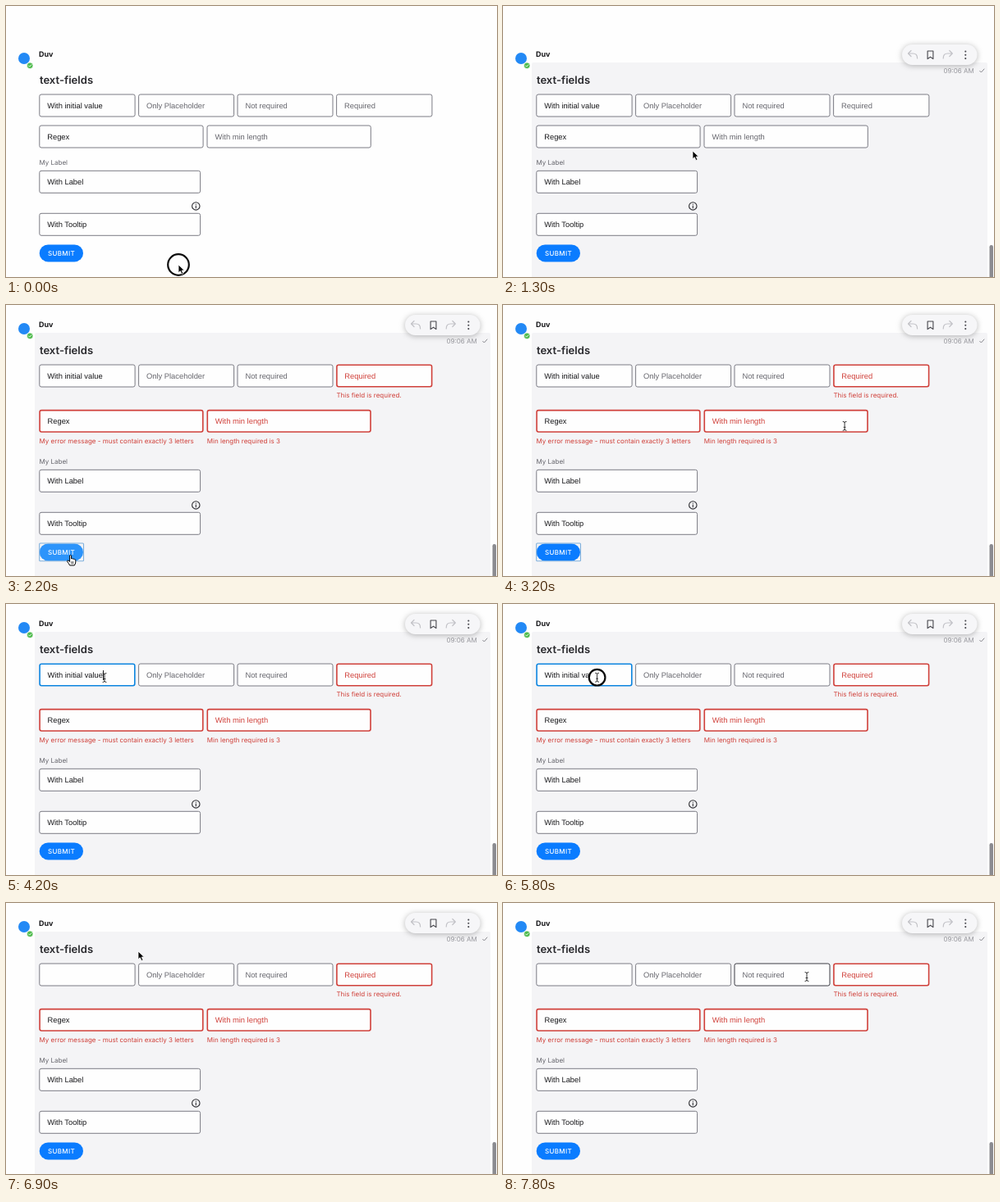
Recreate the animation shown at these times as an HTML page. Size 598 by 331 pixels, loop 8 s.

```html
<!DOCTYPE html>
<html lang="en">
<head>
<meta charset="utf-8">
<title>Text fields form</title>
<style>
  html, body { margin: 0; width: 100%; height: 100%; overflow: hidden; background: #fefefe; }
  svg { display: block; width: 598px; height: 331px; cursor: default; }
  text { font: 8px Inter, Roboto, sans-serif; text-rendering: geometricPrecision; white-space: pre; }
  .value { font: 9.35px "Liberation Sans", Arial, sans-serif; }
  .name { font-size: 9px; font-weight: 700; }
  .title { font-size: 13.1px; font-weight: 600; }
  .button { font-weight: 500; letter-spacing: .3px; text-anchor: middle; }
</style>
</head>
<body>
<svg id="stage" viewBox="0 0 598 331"></svg>
<script>
const LOOP = 8000;
const INK = '#17171a', GREY = '#66666d', RED = '#d0403a', BLUE = '#0a7cff';
const HOVER_AT = 200, ERROR_AT = 2000, FOCUS_AT = 4000, SELECT_AT = 6050, CLEAR_AT = 6400, BLUR_AT = 6700;

// time, x, y of the pointer
const PATH = [
  [0, 210, 316], [150, 210, 316], [500, 262, 255], [900, 306, 190], [1000, 302, 184],
  [1300, 231, 177], [1800, 78.6, 306], [2500, 78.6, 306], [2900, 240, 235], [3300, 448, 132],
  [3500, 462, 112], [3900, 120, 90], [4900, 120, 90], [5700, 114.6, 89.7], [6400, 114.6, 89.7],
  [6700, 161, 59], [7000, 161, 59], [7500, 262, 84], [7700, 370, 90], [8000, 370, 90]
];
const CLICKS = [[-200, 130], [1850, 2050], [3950, 4150], [5770, 5970], [5990, 6190], [6620, 6790]];

const stage = document.getElementById('stage');

function pointerAt(t) {
  const i = Math.max(1, PATH.findIndex(p => p[0] > t));
  const [t0, x0, y0] = PATH[i - 1], [t1, x1, y1] = PATH[i];
  const u = (t - t0) / (t1 - t0), ease = u * u * (3 - 2 * u);
  return { x: x0 + (x1 - x0) * ease, y: y0 + (y1 - y0) * ease };
}

const text = (x, y, label, fill = INK, cls = '') =>
  `<text x="${x}" y="${y}" fill="${fill}" class="${cls}">${label}</text>`;

const rect = (x, y, w, h, r, fill, stroke = 'none', width = 1) =>
  `<rect x="${x}" y="${y}" width="${w}" height="${h}" rx="${r}" fill="${fill}" stroke="${stroke}" stroke-width="${width}"/>`;

const line = (d, stroke, width = 1) =>
  `<path d="${d}" fill="none" stroke="${stroke}" stroke-width="${width}" stroke-linecap="round" stroke-linejoin="round"/>`;

const move = (x, y, content) => `<g transform="translate(${x} ${y})">${content}</g>`;

const inside = (p, b) => p.x >= b.x && p.x <= b.x + b.w && p.y >= b.y && p.y <= b.y + b.h;

function layout(t) {
  const failed = t >= ERROR_AT;
  const first = failed ? 73 : 108, second = failed ? 128.3 : 146;
  const nudge = t >= BLUR_AT ? 1 : 0;
  const box = (x, y, w, label, more) => ({ x, y: y + nudge, w, h: 27, label, ...more });
  return [
    box(40.8, first, 116.3, t < CLEAR_AT ? 'With initial value' : '',
      { focused: t >= FOCUS_AT && t < BLUR_AT }),
    box(161.6, first, 116, 'Only Placeholder', { hint: true }),
    box(282, first, 116, 'Not required', { hint: true }),
    box(402.6, first, 116.3, 'Required', { hint: true, error: failed && 'This field is required.' }),
    box(40.8, second, 199.3, 'Regex',
      { error: failed && 'My error message - must contain exactly 3 letters' }),
    box(245, second, 199.3, 'With min length', { hint: true, error: failed && 'Min length required is 3' }),
    box(40.8, 201.3, 195.8, 'With Label'),
    box(40.8, 253.3, 195.8, 'With Tooltip')
  ];
}

function field(f, hovered, t) {
  const thick = f.error || f.focused;
  const stroke = f.error ? RED : f.focused ? '#0c85e0' : hovered ? '#3c3c44' : '#7b7b84';
  const color = f.hint ? (f.error ? RED : GREY) : INK;
  const inset = thick ? .3 : 0;
  const x = f.x + 9.4 + inset;
  let out = rect(f.x + inset, f.y + inset, f.w - 2 * inset, f.h - 2 * inset, 2.2, '#fefefe', stroke, thick ? 1.6 : 1);
  if (f.focused && t >= SELECT_AT && t < CLEAR_AT) out += rect(x, f.y + 8, 68, 12, 0, '#b3d7ff');
  out += text(x, f.y + 17.1, f.label, color, 'value');
  if (f.focused && (t < SELECT_AT || t >= CLEAR_AT) && Math.floor((t - 3700) / 500) % 2 === 1) {
    out += rect(f.label ? 118 : x, f.y + 8, 1, 12, 0, INK);
  }
  if (f.error) out += text(f.x - .2, f.y + f.h + 13.4, f.error, RED);
  return out;
}

function toolbar() {
  const reply = line('M-2.3-5.5-5.8-2 -2.3 1.5M-5.8-2H0Q5.3-2 5.3 4', '#c2c2c7', 1.2);
  const dots = [-4.3, 0, 4.3].map(y => `<circle cy="${y}" r="1.05" fill="#46464c"/>`).join('');
  return `<g style="filter:drop-shadow(0 1.5px 3.5px rgba(0,0,0,.28))">${rect(486, 47, 91.5, 25, 12.5, '#f6f6f8')}</g>`
    + move(499.3, 60, reply)
    + move(520.5, 59.8, line('M-3.4-4.8H3.4V4.8L0 2.5 -3.4 4.8Z', '#46464c', 1.1))
    + move(541.5, 60, `<g transform="scale(-1 1)">${reply}</g>`)
    + move(563.3, 59.8, dots);
}

const ARROW = `<path d="M0 0V9.8L2.3 7.7 4 11.5 5.9 10.7 4.2 7H7.3Z" fill="#000" stroke="#fff" stroke-width=".8"/>`;
const BEAM = line('M-2-5.5Q0-5.5 0-4Q0-5.5 2-5.5M0-4V4M-2 5.5Q0 5.5 0 4Q0 5.5 2 5.5M-1 1.5H1', '#222', .9);
const HAND = `<path d="M-1 0Q0-1 1 0V4Q2 3 3 4.2 4.2 3.6 4.8 4.8 6 4.4 6.2 5.8V8Q6 10 4.8 12H-1Q-2 9.7-4 7.3 -4.2 5.8-2.8 6L-1 7.5Z"
  fill="#fff" stroke="#000" stroke-width="1"/>` + line('M1.2 7.5V10M3 7.5V10', '#000', .7);

function ring(t, p) {
  const click = CLICKS.find(([from, to]) => t >= from && t < to);
  if (!click) return '';
  const r = 9.2 + 3.6 * Math.min(1, (t - click[0]) / 180);
  return `<circle cx="${p.x}" cy="${p.y}" r="${r}" fill="#fefefe" stroke="#0c0c0c" stroke-width="2.2"/>`;
}

function scene(t) {
  const p = pointerAt(t), fields = layout(t);
  const active = t >= HOVER_AT;
  const up = t >= ERROR_AT ? -35 : 0, nudge = t >= BLUR_AT ? 1 : 0, head = up + nudge;
  const button = { x: 40.7, y: 291.4 + nudge, w: 53.3, h: 21 };
  const overField = fields.find(f => inside(p, f)), overButton = inside(p, button);
  let out = '';

  if (active) {
    out += rect(35, 69 + head, 555, 300, 2, '#f4f4f6') + rect(592.5, 292, 4.5, 45, 2.2, '#8b8b90');
    out += move(0, up, text(536.5, 82, '09:06 AM', '#98989e')
      + line('M580.7 79.3 582.4 81 586 77', '#88888e', 1) + toolbar());
  }

  out += move(0, up, `<circle cx="22" cy="64" r="7" fill="#2389f5"/>
    <circle cx="29.2" cy="72.8" r="3.8" fill="#4fbb4d" stroke="#fefefe" stroke-width=".7"/>`
    + line('M27.5 72.9 28.7 74.1 31 71.7', '#fff', .9));
  out += text(40, 62.3 + head, 'Duv', INK, 'name') + text(40.9, 94.8 + head, 'text-fields', '#29292d', 'title');

  out += fields.map(f => field(f, active && f === overField, t)).join('');
  out += text(40.5, 193.5 + nudge, 'My Label', GREY);
  out += `<circle cx="231.3" cy="244.4" r="4.7" fill="none" stroke="#2b2b30" stroke-width="1.1"/>`
    + line('M231.3 244.1V246.8M231.3 242.1V242.2', '#2b2b30', 1.1);

  out += rect(button.x, button.y, button.w, button.h, 10.5, overButton ? '#2c94fb' : BLUE);
  if (t >= 1900 && t < FOCUS_AT - 50) out += rect(40.7, 291, 53.8, 21.8, 1, 'none', '#7fb0dc', 1.1);
  out += text(67.5, 304.5 + nudge, 'SUBMIT', '#fff', 'button');

  out += ring(t, p);
  return out + move(p.x, p.y, overButton ? HAND : overField ? BEAM : ARROW);
}

const start = performance.now();
function frame() {
  stage.innerHTML = scene((performance.now() - start) % LOOP);
  requestAnimationFrame(frame);
}
frame();
</script>
</body>
</html>
```
